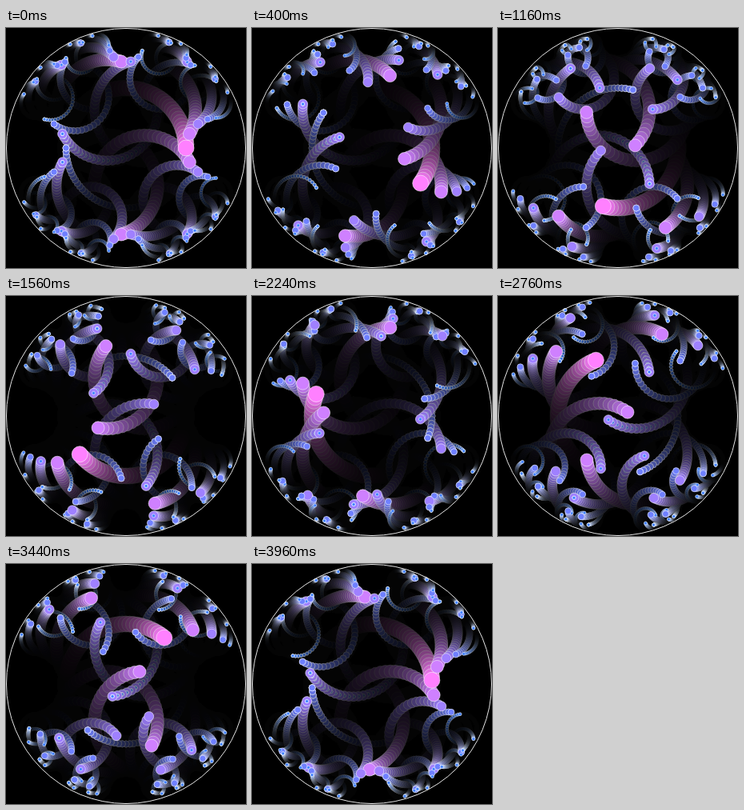
Recreate the animation shown at these times as an HTML page with a canvas. Size 300 by 300 pixels, loop 4000 ms.

```html
<!DOCTYPE html>
<html lang="en">
<head>
<meta charset="utf-8">
<title>Modular group orbit</title>
<style>
  html, body { margin: 0; width: 100%; height: 100%; overflow: hidden; background: #000; }
  canvas { display: block; width: 300px; height: 300px; }
  #rim {
    position: absolute; left: 0; top: 0; width: 300px; height: 300px;
    box-sizing: border-box; border: 1px solid #e4e4e4; border-radius: 50%;
  }
</style>
</head>
<body>
<canvas id="stage" width="300" height="300"></canvas>
<div id="rim"></div>
<script>
const ctx = document.getElementById('stage').getContext('2d');
const STEP = 40, STEPS = 100, SIZE = 300, R = SIZE / 2;
const FADE = 0.11, MAX_DEPTH = 4;

// Parabolic generators of the modular group; entry i ^ 1 is the inverse of i.
const GENERATORS = [[1, 0, -1, 1], [1, 0, 1, 1], [1, -1, 0, 1], [1, 1, 0, 1]];

const multiply = ([a, b, c, d], [e, f, g, h]) =>
  [a * e + b * g, a * f + b * h, c * e + d * g, c * f + d * h];

// All reduced words in depth-first order, which is also the painting order.
const words = [];
function collect(matrix, depth, last) {
  words.push({ matrix, depth });
  if (depth === MAX_DEPTH) return;
  GENERATORS.forEach((generator, i) => {
    if (i !== (last ^ 1)) collect(multiply(generator, matrix), depth + 1, i);
  });
}
collect([1, 0, 0, 1], 0, -1);

function toHalfPlane(u, v) {
  const n = (1 - u) ** 2 + v * v;
  return [-2 * v / n, (1 - u * u - v * v) / n];
}

function toDisc(x, y) {
  const n = x * x + (y + 1) ** 2;
  return [(x * x + y * y - 1) / n, -2 * x / n];
}

function transform([a, b, c, d], x, y) {
  const n = (c * x + d) ** 2 + (c * y) ** 2;
  return [((a * x + b) * (c * x + d) + a * c * y * y) / n, y / n];
}

function drawStep(step) {
  ctx.fillStyle = `rgba(0, 0, 0, ${FADE})`;
  ctx.fillRect(0, 0, SIZE, SIZE);

  const angle = 2 * Math.PI * (step % STEPS) / STEPS;
  const [x, y] = toHalfPlane(Math.cos(angle) / 2, Math.sin(angle) / 2);
  ctx.strokeStyle = '#fff';
  ctx.lineWidth = 0.55;
  for (const { matrix, depth } of words) {
    const [u, v] = toDisc(...transform(matrix, x, y));
    ctx.beginPath();
    ctx.arc(R + R * u, R + R * v, 10 - 2 * depth, 0, 2 * Math.PI);
    ctx.fillStyle = `rgb(${255 - 48 * depth}, 128, 255)`;
    ctx.fill();
    ctx.stroke();
  }
}

// Trails build up step by step, beginning with one full warm-up loop.
let drawn = -STEPS - 1;
function render() {
  const current = Math.floor(performance.now() / STEP);
  drawn = Math.max(drawn, current - STEPS - 1);
  while (drawn < current) drawStep(++drawn + STEPS);
  requestAnimationFrame(render);
}
ctx.fillStyle = '#000';
ctx.fillRect(0, 0, SIZE, SIZE);
render();
</script>
</body>
</html>
```
